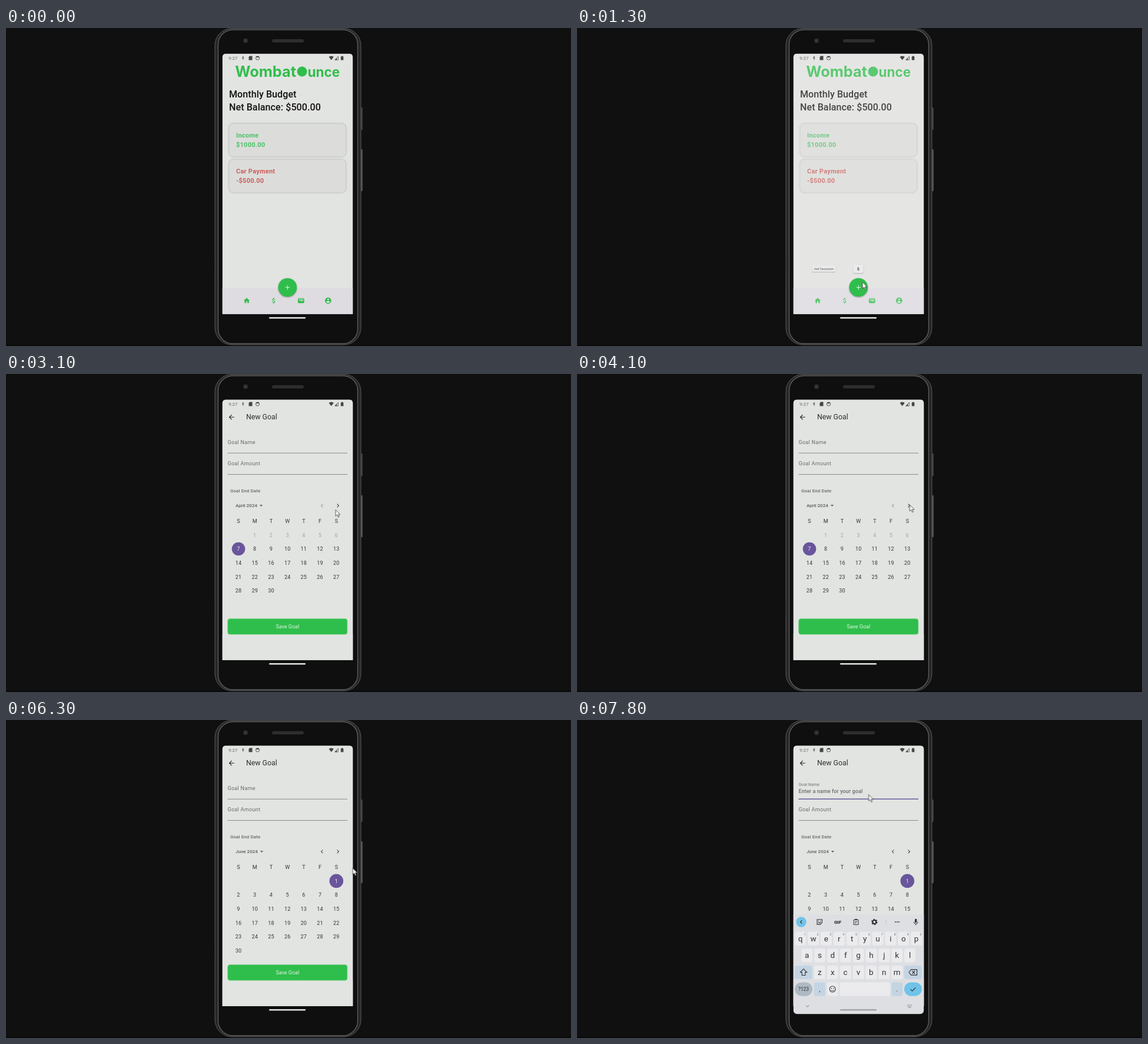
These frames come from a looping animation (960 px wide and 540 px high, 8000 ms). An HTML page:

```html
<!DOCTYPE html>
<html lang="en">
<head>
<meta charset="utf-8">
<title>Budget app on a phone</title>
<style>
  html, body { margin: 0; width: 100%; height: 100%; overflow: hidden; background: #101010; }
  svg { display: block; width: 960px; height: 540px; }
  text { font-family: Roboto, "Noto Sans", sans-serif; white-space: pre; }
  .pop { transform-box: fill-box; transform-origin: center; }
  #goal { transform-origin: 478px 265px; }
  .lift { filter: drop-shadow(0 1px 1.2px rgba(0, 0, 0, .38)); }
</style>
</head>
<body>
<svg id="stage" viewBox="0 0 960 540" xmlns="http://www.w3.org/2000/svg"></svg>
<script>
const LOOP = 8000;
const GREEN = '#2fbe4b', PURPLE = '#69559b', PAGE = '#e2e4e1', INK = '#343634';

// Drawing helpers
const rect = (x, y, w, h, r, fill, extra = '') =>
  `<rect x="${x}" y="${y}" width="${w}" height="${h}" rx="${r}" fill="${fill}" ${extra}/>`;
const circle = (x, y, r, fill, extra = '') =>
  `<circle cx="${x}" cy="${y}" r="${r}" fill="${fill}" ${extra}/>`;
const text = (s, x, y, size, fill, extra = '') =>
  `<text x="${x}" y="${y}" font-size="${size}" fill="${fill}" ${extra}>${s}</text>`;
const mid = (s, x, y, size, fill, extra = '') =>
  text(s, x, y, size, fill, `text-anchor="middle" ${extra}`);
const line = (d, color, width = 1, extra = '') =>
  `<path d="${d}" fill="none" stroke="${color}" stroke-width="${width}" ${extra}/>`;
const icon = (d, x, y, size, fill) =>
  `<path d="${d}" fill="${fill}" fill-rule="evenodd" transform="translate(${x - size / 2} ${y - size / 2}) scale(${size / 24})"/>`;
const group = (id, body, extra = '') => `<g id="${id}" ${extra}>${body}</g>`;

const HOME = 'M10 20v-6h4v6h5v-8h3L12 3 2 12h3v8z';
const DOLLAR = 'M11.8 10.9c-2.27-.59-3-1.2-3-2.15 0-1.09 1.01-1.85 2.7-1.85 1.78 0 2.44.85 2.5 2.1h2.21' +
  'c-.07-1.72-1.12-3.3-3.21-3.81V3h-3v2.16c-1.94.42-3.5 1.68-3.5 3.61 0 2.31 1.91 3.46 4.7 4.13 2.5.6 3 1.48 3 2.41' +
  ' 0 .69-.49 1.79-2.7 1.79-2.06 0-2.87-.92-2.98-2.1h-2.2c.12 2.19 1.76 3.42 3.68 3.83V21h3v-2.15' +
  'c1.95-.37 3.5-1.5 3.5-3.55 0-2.84-2.43-3.81-4.7-4.4z';
const WALLET = 'M18 4H6q-4 0-4 4v8q0 4 4 4h12q4 0 4-4V8q0-4-4-4zm-1.9 9.8q-.4.3-.9.2L4.2 11.2q.5-1.2 1.8-1.2h12' +
  'q1 0 1.6.8zM6 6h12q2 0 2 2v.6q-.9-.6-2-.6H6q-1.1 0-2 .6V8q0-2 2-2z';
const PERSON = 'M12 2a10 10 0 1 0 0 20a10 10 0 1 0 0-20zm0 3a3 3 0 1 1 0 6a3 3 0 1 1 0-6z' +
  'm0 14.2c-2.5 0-4.7-1.3-6-3.2 0-2 4-3.1 6-3.1s6 1.1 6 3.1c-1.3 1.9-3.5 3.2-6 3.2z';
const BACK = 'M20 11H7.8l5.6-5.6L12 4l-8 8 8 8 1.4-1.4L7.8 13H20z';

const phone = () =>
  rect(0, 538, 960, 2, 0, '#090909') +
  rect(603, 135, 3, 38, 1, '#3d3d3d') + rect(603, 206, 3, 71, 1, '#505050') +
  rect(354, 384, 2, 25, 1, '#050505') +
  rect(355, .5, 248, 537.5, 29, '#262626', 'stroke="#5a5a5a"') +
  rect(360.5, 3, 237, 533, 25, '#0f0f0f', 'stroke="#5f5f5f" stroke-width="1.3"') +
  circle(407, 21.5, 4, '#2c2c2c') + circle(407, 21.5, 2, '#3b3b3b') +
  rect(452, 19, 54, 5.5, 2.7, '#2e2e2e') +
  rect(447, 491, 62, 2.6, 1.3, '#e2e2e2');

const status = () => {
  const c = '#6a6c6a', d = '#454745';
  return text('9:27', 378, 54, 8, c) +
    rect(401.7, 48, 2.2, 4, 1.1, c) + line('M400.9 51.2q1.9 2.6 3.8 0M402.8 52.5v2', c, .7) +
    `<path d="M414.2 47.5h4.3v7h-6v-5.3z" fill="${d}"/>` +
    circle(427.5, 51, 3.1, 'none', `stroke="${d}" stroke-width=".9"`) +
    rect(425, 48, 5, 2, 1, d) +
    `<path d="M548.5 49q4.2-3.2 8.4 0l-4.2 5.4z" fill="${d}"/>` +
    line('M558.8 54.2h5.6v-6z', d, .8) + `<path d="M558.8 54.2h3.4v-3.4z" fill="${d}"/>` +
    rect(568.8, 48.2, 4.6, 6.4, .7, d) + rect(570.2, 47.4, 1.8, 1.5, 0, d);
};

const card = (y, name, sum, color) => {
  const style = 'font-weight="600" letter-spacing=".25"';
  return rect(378.5, y - .3, 199.5, 57.1, 8.5, 'none', 'stroke="#c9cbc9" stroke-opacity=".45" stroke-width="3.4"') +
    rect(379, y + .2, 198.5, 56.1, 8, '#dcdddb', 'stroke="#c9cac8"') +
    text(name, 391, y + 23.6, 11, color, style) + text(sum, 391, y + 40, 11, color, style);
};

const logo = () => {
  const style = 'font-weight="700" style="font-family:Inter,sans-serif"';
  return text('Wombat', 493, 83, 25.3, GREEN, `text-anchor="end" ${style}`) +
    circle(503, 74, 8.5, GREEN) + text('unce', 512.5, 83, 22.5, GREEN, style);
};

const home = () => {
  const title = 'font-weight="500" letter-spacing=".1"';
  return rect(367, 43, 223, 443, 0, PAGE) + logo() +
    text('Monthly Budget', 379, 117.6, 16, '#111', title) +
    text('Net Balance: $500.00', 379, 140.2, 16, '#111', title) +
    card(162, 'Income', '$1000.00', '#4dc167') +
    card(223, 'Car Payment', '-$500.00', '#c95f5b') +
    rect(367, 441, 223, 45, 0, '#dedce1') +
    icon(HOME, 409, 463, 12.5, GREEN) + icon(DOLLAR, 455, 463, 12.5, GREEN) +
    icon(WALLET, 501.3, 463, 13, GREEN) + icon(PERSON, 547.3, 463, 13, GREEN);
};

const chip = (id, x, y, w, s) => group(id,
  rect(x, y - 8.7, w, 17.4, 2.5, '#ebebeb', 'class="lift"') +
  mid(s, x + w / 2, y + 2.8, 8, '#555'), 'class="pop"');
const key = (id, y, body) => group(id,
  rect(462, y - 13, 32, 26, 6, '#ebebeb', 'class="lift"') + body, 'class="pop"');

const dial = () =>
  chip('chipA', 385, 409, 69, 'Add Transaction') +
  key('keyA', 409, icon(DOLLAR, 478, 409, 13, '#222')) +
  chip('chipB', 411, 377.6, 43, 'Add Goal') +
  key('keyB', 377.6, rect(462, 364.6, 32, 26, 6, '#000', 'id="hoverB" opacity="0"') +
    icon(WALLET, 478, 377.6, 13, '#222')) +
  circle(478.3, 440.5, 15.8, GREEN, 'class="lift"') +
  line('M474.6 440.5h7.4M478.3 436.8v7.4', '#d9f3de', 1.1);

const column = i => 395 + i * 27.72;
const row = i => 273.3 + i * 23.68;
const day = (s, x, y, color) => mid(s, x, y + 3.2, 9, color, 'letter-spacing=".2"');

function month(id, name, width, first, days, past = 0) {
  let body = text(name, 390, 226.2, 8, '#5c5e5c', 'font-weight="500"') +
    `<path d="M${390 + width} 222.2h5.4l-2.7 2.9z" fill="#5c5e5c"/>`;
  for (let n = 1; n <= days; n++) {
    const cell = first + n - 1;
    body += day(n, column(cell % 7), row(Math.floor(cell / 7)), n <= past ? '#a3a5a2' : INK);
  }
  return group(id, body);
}
const picked = (n, x, y, r) => circle(x, y, r, PURPLE) + day(n, x, y, '#f0ecf6');

const goal = () =>
  rect(367, 43, 223, 443, 0, PAGE) +
  icon(BACK, 383.2, 73.3, 13.5, '#222') + text('New Goal', 408, 77.3, 12.3, '#2f312f') +
  group('label', text('Goal Name', 0, 0, 9, '#696b6c', 'letter-spacing=".3"')) +
  group('hint', text('Enter a name for your goal', 376.5, 124.4, 9, '#696b70', 'font-weight="500" letter-spacing=".1"')) +
  line('M376.5 134.3H580', '#8b8d8b') +
  group('focus', line('M376.5 134.2H580', '#6a609e', 1.5)) +
  text('Goal Amount', 376.5, 155.2, 9, '#696b6c', 'letter-spacing=".3"') +
  line('M376.5 170.5H580', '#8b8d8b') +
  text('Goal End Date', 381, 201.3, 7.9, '#666866', 'font-weight="500" letter-spacing=".12"') +
  circle(564, 223.5, 11, '#000', 'id="ripple"') +
  line('M538.3 220.6l-2.8 2.9 2.8 2.9', '#555', 1.1, 'id="prev"') +
  line('M562.6 220.6l2.8 2.9-2.8 2.9', '#444', 1.1) +
  [...'SMTWTFS'].map((s, i) => mid(s, column(i), 252.7, 9, INK)).join('') +
  month('april', 'April 2024', 40.8, 1, 30, 6) +
  month('may', 'May 2024', 39.4, 3, 31) +
  month('june', 'June 2024', 41.8, 6, 30) +
  group('pickApril', picked(7, column(0), row(1), 11.3)) +
  group('pickJune', picked(1, column(6), row(0), 11.8)) +
  rect(376.8, 415.7, 203, 26.4, 3.6, GREEN, 'stroke="#62cb76" stroke-width=".8"') +
  mid('Save Goal', 478.3, 432, 9, '#dff5e3');

function keyboard() {
  const cap = '#ebebed', blue = '#c4d4e2', sky = '#70c3e9', ink = '#303236';
  const button = (s, x, y) => rect(x - 9.4, y - 11.6, 18.8, 23.2, 3.2, cap) + mid(s, x, y + 4.6, 13.5, ink);
  const letters = (s, x, y) => [...s].map((c, i) => button(c, x + i * 21.88, y)).join('');
  let out = rect(367, 330, 223, 172, 0, '#dedfe3') +
    circle(381, 343, 8.7, sky) + line('M382.3 340.2l-2.8 2.8 2.8 2.8', ink, 1.1) +
    line('M408 338.7h8.4v5.4l-3 3H408zM410 343.5q2 2 4.2 0', ink, 1.1) +
    rect(409.8, 340.7, 1.2, 1.2, 0, ink) + rect(413.2, 340.7, 1.2, 1.2, 0, ink) +
    mid('GIF', 443, 346, 8, ink, 'font-weight="900"') +
    line('M470.2 339.2h7.8v8.4h-7.8zM472 342.4h4.2M472 345h3', ink, 1) + rect(472.2, 337.7, 3.8, 2.4, 1, ink) +
    circle(505.3, 343, 3, 'none', `stroke="${ink}" stroke-width="2.2"`) +
    circle(505.3, 343, 4.6, 'none', `stroke="${ink}" stroke-width="1.4" stroke-dasharray="2.4 2.417"`) +
    line('M525 337.5v11', '#c2c4c8', .8) +
    [-3, 0, 3].map(d => circle(544 + d, 343, 1, ink)).join('') +
    rect(574, 337.6, 3.4, 6.6, 1.7, ink) + line('M572.2 342.6q0 3.6 3.5 3.6t3.5-3.6M575.7 346.2v2.4', ink, 1) +
    letters('qwertyuiop', 379.7, 371.2) + letters('asdfghjkl', 390.6, 399.8) + letters('zxcvbnm', 412.4, 428.5);
  [...'1234567890'].forEach((c, i) => { out += mid(c, 387 + i * 21.88, 366, 5, '#66686c'); });
  out += rect(370, 417, 30, 23, 3.4, blue) + line('M385 422.7l-5.6 5.8h2.8v5h5.6v-5h2.8z', ink, 1.1) +
    rect(556, 417, 30, 23, 3.4, blue) +
    line('M564 428.5l3.6-4.6h10v9.2h-10zM569.6 426.2l4.6 4.6M574.2 426.2l-4.6 4.6', ink, 1.1) +
    rect(370, 445.4, 30, 23.4, 11.7, '#adbac4') + mid('?123', 385, 460.2, 8.4, ink) +
    rect(403, 445.4, 18.8, 23.4, 3.2, blue) + mid(',', 412.4, 461, 11, ink) +
    rect(424.8, 445.4, 18.8, 23.4, 3.2, cap) +
    circle(434.2, 457, 5, 'none', `stroke="${ink}" stroke-width="1.1"`) +
    circle(432.4, 455.7, .8, ink) + circle(436, 455.7, .8, ink) + line('M431.4 458.6q2.8 3 5.6 0', ink, .9) +
    rect(446.5, 445.4, 85.3, 23.4, 3.2, cap) +
    rect(534.4, 445.4, 18.8, 23.4, 3.2, blue) + mid('.', 543.8, 461, 11, ink) +
    rect(556, 445.4, 30, 23.4, 11.7, sky) + line('M566.6 457.2l3 3 5.8-5.8', ink, 1.2) +
    line('M389 484.6l2.7 2.7 2.7-2.7', '#66686c', .9) +
    rect(447, 491, 62, 2.4, 1.2, '#a3a4a8') +
    line('M561 484h8M561 486h8', '#77797d', 1.1, 'stroke-dasharray="1.2 .9"') + line('M562.5 488.2h5', '#77797d', .9);
  return out;
}

stage.innerHTML =
  `<clipPath id="glass"><path d="M367.8 485.8V49.5q0-5.7 5.7-5.7h110H583.5q5.7 0 5.7 5.7V485.8z"/></clipPath>
   <clipPath id="panel">${rect(367.8, 44, 221.4, 455.3, 6, '#000')}</clipPath>` +
  phone() +
  `<g clip-path="url(#glass)">` + home() + rect(367, 43, 223, 443, 0, '#ececec', 'id="veil"') +
  dial() + group('goal', goal()) + status() + `</g>` +
  `<g clip-path="url(#panel)">` + group('keys', keyboard()) + `</g>` +
  group('cursor', '<path d="M0 0V11L2.6 8.7 4.5 12.8 6.2 12 4.4 8.1H7.9Z" fill="#f4f4f4" stroke="#3a3a3a" stroke-width=".8"/>');

// Each step is [time, value]; the value holds until the next step.
function play(id, prop, steps) {
  const frames = steps.map(([t, v]) => ({ offset: t / LOOP, [prop]: v, easing: 'step-end' }));
  frames.push({ offset: 1, [prop]: steps.at(-1)[1] });
  document.getElementById(id).animate(frames, { duration: LOOP, iterations: Infinity });
}
const fade = (id, ...steps) => play(id, 'opacity', steps);
const scale = (id, ...steps) => play(id, 'transform', steps.map(([t, s]) => [t, `scale(${s})`]));
const move = (id, ...steps) =>
  play(id, 'transform', steps.map(([t, x, y, s = 1]) => [t, `translate(${x}px, ${y}px) scale(${s})`]));

fade('cursor', [0, 0], [500, 1]);
move('cursor', [0, 575, 470], [600, 548, 456], [800, 508, 441], [1000, 485, 431.5], [1900, 483, 417],
  [2200, 481, 376.5], [2600, 497, 345], [2700, 522, 300], [2800, 542, 262], [2900, 554, 240], [3100, 560, 230.5],
  [3300, 563, 226], [3500, 566, 222], [4100, 565.2, 222], [5600, 557.5, 272], [6300, 589, 251.5],
  [6400, 562, 214], [6500, 522, 156], [6600, 495.5, 126.5]);

// Speed dial
fade('veil', [0, 0], [1300, .24], [1600, .8]);
for (const id of ['chipA', 'keyA']) scale(id, [0, 0], [1300, .57], [1600, 1]);
for (const id of ['chipB', 'keyB']) scale(id, [0, 0], [1600, 1]);
fade('hoverB', [0, 0], [2200, .04], [2300, .09]);

// Goal page and calendar
fade('goal', [0, 0], [2400, .35], [2500, .8], [2600, 1]);
scale('goal', [0, .9], [2400, .94], [2500, .98], [2600, 1]);
fade('april', [0, 1], [4400, 0]);
fade('pickApril', [0, 1], [4400, 0]);
fade('may', [0, 0], [4400, 1], [5200, 0]);
fade('june', [0, 0], [5200, 1]);
fade('pickJune', [0, 0], [6300, 1]);
fade('prev', [0, .5], [4400, 1]);
fade('ripple', [0, 0], [4400, .08], [4800, .035], [5200, .08], [5400, .035], [5600, 0]);

// Focused field and keyboard
move('label', [0, 376.5, 119.3], [6900, 376.5, 117, .92], [7000, 376.5, 113, .79], [7100, 376.5, 112, .75]);
fade('hint', [0, 0], [7000, .5], [7100, 1]);
fade('focus', [0, 0], [6900, 1]);
move('keys', [0, 0, 175], [7000, 0, 105], [7100, 0, 42], [7200, 0, 12], [7300, 0, 0]);
</script>
</body>
</html>
```
